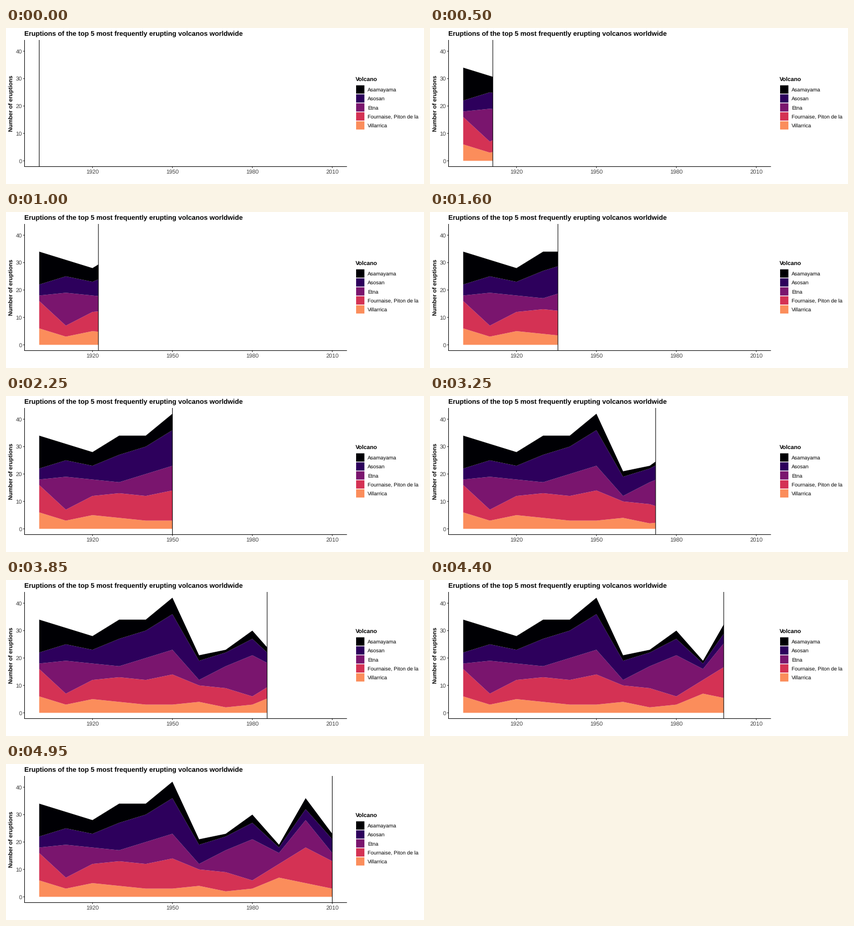
Write a matplotlib script that moves like this. It is 800x300 px and loops after 5 s.

```python
import numpy as np
import matplotlib.pyplot as plt
from matplotlib.animation import FuncAnimation

plt.rcParams["font.family"] = "Liberation Sans"
plt.rcParams["text.hinting"] = "none"

W, H, DPI = 800, 300, 100
FRAMES, INTERVAL = 100, 50
LEFT, RIGHT, TOP, BOTTOM = 35.5, 652.5, 23.0, 266.5
LINE, TICK = 1.07, 2.75
LABEL_GREY, TICK_GREY = "#3f3f3f", "#262626"

YEARS = np.arange(1900, 2011, 10)
# Stacked from the bottom: name, colour, eruptions per decade
SERIES = [
    ("Villarrica", "#fb8d5b", [6, 3, 5, 4, 3, 3, 4, 2, 3, 7, 5, 3]),
    ("Fournaise, Piton de la", "#d43254",
     [10, 4, 7, 9, 9, 11, 6, 7, 3, 5, 13, 10]),
    ("Etna", "#7a156e", [2, 12, 6, 4, 8, 9, 2, 8, 15, 4, 10, 3]),
    ("Asosan", "#2d005c", [4, 6, 5, 10, 10, 13, 7, 5, 6, 2, 4, 5]),
    ("Asamayama", "#000004", [12, 6, 5, 7, 4, 6, 2, 1, 3, 1, 4, 2]),
]
LEVELS = np.vstack([np.zeros(len(YEARS)),
                    np.cumsum([s[2] for s in SERIES], axis=0)])


def x_of(year):
    return LEFT + (year - 1894.5) / 121 * (RIGHT - LEFT)


def y_of(count):
    return BOTTOM - (count + 2.1) / 46.2 * (BOTTOM - TOP)


def pt(px):
    return px * 72 / DPI


fig = plt.figure(figsize=(W / DPI, H / DPI), dpi=DPI, facecolor="white")
ax = fig.add_axes([0, 0, 1, 1])
ax.set_xlim(0, W)
ax.set_ylim(H, 0)
ax.axis("off")


def line(xs, ys, color="black", z=3):
    return ax.plot(xs, ys, color=color, lw=pt(LINE), zorder=z,
                   solid_capstyle="butt", snap=False)[0]


def text(x, y, s, size, **kw):
    return ax.text(x, y, s, fontsize=pt(size),
                   **{"va": "baseline", "color": "black", **kw})


def draw_axes():
    half = LINE / 2
    line([LEFT, LEFT], [TOP, BOTTOM + half])
    line([LEFT - half, RIGHT], [BOTTOM, BOTTOM])
    for n in range(0, 41, 10):
        y = y_of(n)
        line([LEFT - TICK, LEFT], [y, y], TICK_GREY, 2)
        text(30.6, y + 4, str(n), 11, ha="right", color=LABEL_GREY)
    for year in range(1920, 2011, 30):
        x = x_of(year)
        line([x, x], [BOTTOM, BOTTOM + TICK], TICK_GREY, 2)
        text(x, 280, str(year), 11, ha="center", color=LABEL_GREY)
    text(LEFT - 0.5, 15, "Eruptions of the top 5 most frequently erupting "
         "volcanos worldwide", 13, weight="bold")
    text(13.5, (TOP + BOTTOM) / 2, "Number of eruptions", 11, weight="bold",
         rotation=90, ha="right", va="center").set(
             ha="center", va="baseline", rotation_mode="anchor")


def draw_legend():
    text(669, 103, "Volcano", 11, weight="bold")
    size = 15.86
    for i, (name, color, _) in enumerate(reversed(SERIES)):
        y = 118.2 + 17.28 * i
        ax.add_patch(plt.Rectangle((678 - size / 2, y - size / 2), size, size,
                                   fc=color, lw=0, snap=False))
        text(691.7, y + 3.7, name, 10)


draw_axes()
draw_legend()
areas = [ax.fill([0, 0, 0], [0, 0, 0], fc=color, lw=0, zorder=1,
                 snap=False)[0] for _, color, _ in SERIES]
cursor = line([0, 0], [TOP, BOTTOM], z=4)


def update(frame):
    now = 1900 + 110 * frame / (FRAMES - 1)
    years = np.append(YEARS[YEARS < now], now)
    xs = x_of(years)
    ys = [y_of(np.interp(years, YEARS, level)) for level in LEVELS]
    for area, low, high in zip(areas, ys, ys[1:]):
        area.set_xy(np.column_stack([np.append(xs, xs[::-1]),
                                     np.append(high, low[::-1])]))
    cursor.set_xdata([xs[-1], xs[-1]])
    return [*areas, cursor]


anim = FuncAnimation(fig, update, frames=FRAMES, interval=INTERVAL,
                     repeat=True, repeat_delay=0)
plt.show()
```
